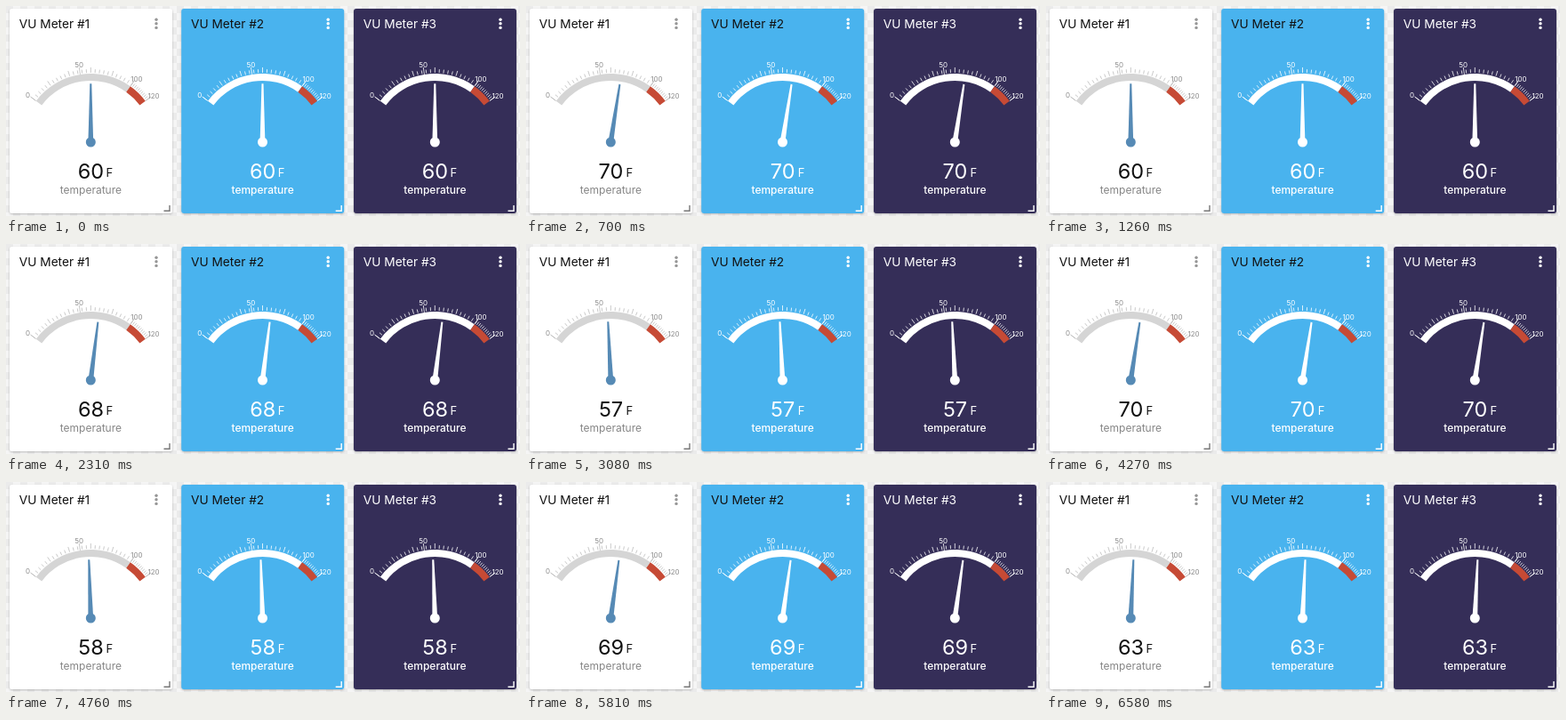
An HTML page that plays this animation: 578x236 px, repeating every 6.65 s.

```html
<!DOCTYPE html>
<html lang="en">
<head>
<meta charset="utf-8">
<title>VU meters</title>
<style>
  html, body { margin: 0; width: 100%; height: 100%; overflow: hidden; background: #f2f2f2; }
  svg { display: block; font-family: Inter, Roboto, sans-serif; }
  .title { font-size: 13.7px; }
  .label { font-size: 8px; text-anchor: middle; }
  .value { font-size: 23.5px; text-anchor: middle; }
  .unit { font-size: 13px; }
  .name { font-size: 12px; text-anchor: middle; }
</style>
</head>
<body>
<svg id="stage" width="578" height="236" viewBox="0 0 578 236">
  <defs>
    <pattern id="checks" width="16" height="16" patternUnits="userSpaceOnUse">
      <rect width="16" height="16" fill="#f5f5f5"/>
      <path d="M0 0h8v8H0zM8 8h8v8H8z" fill="#ebebeb"/>
    </pattern>
    <filter id="shadow" x="-5%" y="-5%" width="110%" height="110%">
      <feDropShadow dx="0" dy="1" stdDeviation="1.2" flood-color="#000" flood-opacity=".25"/>
    </filter>
  </defs>
  <rect width="578" height="236" fill="url(#checks)"/>
</svg>
<script>
const LOOP = 6650;
const MAX = 120;
const SWEEP = 106;
const PIVOT = { x: 95.3, y: 153 };

// [start in ms, reading]
const READINGS = [
  [0, 60], [70, 58], [560, 70], [1050, 60], [1610, 64], [2100, 68], [2660, 61],
  [2940, 57], [3430, 63], [3990, 70], [4620, 58], [5180, 71], [5810, 69], [6300, 63]
];

const THEMES = [
  { x: 0, bg: '#ffffff', title: '#111', value: '#111', name: '#858585', arc: '#d5d5d5',
    tick: '#bcbcbc', label: '#8c8c8c', needle: '#568ab5', dots: '#969696', grip: '#777', weight: 400 },
  { x: 193.2, bg: '#48b3ee', title: '#111', arc: '#fff', weight: 500 },
  { x: 387, bg: '#352e58', title: '#fff', arc: '#fff', weight: 500 }
];

const stage = document.getElementById('stage');

function add(parent, tag, attrs, text) {
  const el = document.createElementNS('http://www.w3.org/2000/svg', tag);
  for (const key in attrs) el.setAttribute(key, attrs[key]);
  if (text !== undefined) el.textContent = text;
  parent.append(el);
  return el;
}

const angle = value => (value / MAX - 0.5) * SWEEP;

function polar(value, r) {
  const a = angle(value) * Math.PI / 180;
  return [PIVOT.x + r * Math.sin(a), PIVOT.y - r * Math.cos(a)].map(n => n.toFixed(2)).join(' ');
}

function band(from, to, inner, outer) {
  return `M${polar(from, outer)}A${outer} ${outer} 0 0 1 ${polar(to, outer)}` +
    `L${polar(to, inner)}A${inner} ${inner} 0 0 0 ${polar(from, inner)}Z`;
}

function ticks() {
  let d = '';
  for (let v = 0; v <= MAX; v += v < 100 ? 4 : 2) {
    d += `M${polar(v, 78)}L${polar(v, v % 20 ? 82 : 84)}`;
  }
  for (const v of [0, 50, 100, 120]) d += `M${polar(v, 77)}L${polar(v, 85)}`;
  return d;
}

function buildCard(theme, i) {
  const c = { value: '#fff', name: '#fff', tick: '#fff', label: '#fff', needle: '#fff',
    dots: '#fff', grip: '#fff', ...theme };
  const g = add(stage, 'g', { transform: `translate(${c.x} 0)` });
  const text = (cls, x, y, fill, str, weight = 400) =>
    add(g, 'text', { class: cls, x, y, fill, 'font-weight': weight }, str);

  add(g, 'rect', { x: 4, y: 3, width: 183, height: 230, rx: 3, fill: c.bg, filter: 'url(#shadow)' });
  text('title', 14.8, 25, c.title, `VU Meter #${i + 1}`);
  for (const y of [15.2, 19.8, 24.4]) add(g, 'circle', { cx: 169, cy: y, r: 1.7, fill: c.dots });

  add(g, 'path', { d: ticks(), stroke: c.tick, 'stroke-width': 0.8, fill: 'none' });
  add(g, 'path', { d: band(0, 100, 69, 77), fill: c.arc });
  add(g, 'path', { d: band(100, 120, 69, 77), fill: '#c64a35' });
  text('label', 24.5, 103, c.label, '0');
  text('label', 82.2, 69, c.label, '50');
  text('label', 147, 85, c.label, '100');
  text('label', 166, 104, c.label, '120');

  const needle = add(g, 'path', {
    d: `M${PIVOT.x - 1} 87.2h2L${PIVOT.x + 2.9} 153h-5.8Z`, fill: c.needle
  });
  add(g, 'circle', { cx: PIVOT.x, cy: PIVOT.y, r: 5.5, fill: c.needle });

  const value = text('value', 95.5, 194, c.value, '');
  text('unit', 112.6, 192, c.value, 'F');
  text('name', 95.4, 211, c.name, 'temperature', c.weight);
  add(g, 'path', { d: 'M184 224v6.3h-6.5', fill: 'none', stroke: c.grip, 'stroke-width': 1.4 });

  return reading => {
    needle.setAttribute('transform', `rotate(${angle(reading)} ${PIVOT.x} ${PIVOT.y})`);
    value.textContent = reading;
  };
}

const cards = THEMES.map(buildCard);
let shown;

function draw(now) {
  const t = now % LOOP;
  const reading = READINGS.findLast(([start]) => start <= t)[1];
  if (reading !== shown) {
    cards.forEach(show => show(reading));
    shown = reading;
  }
}

function frame() {
  draw(performance.now() - begin);
  requestAnimationFrame(frame);
}

const begin = performance.now();
frame();
</script>
</body>
</html>
```
